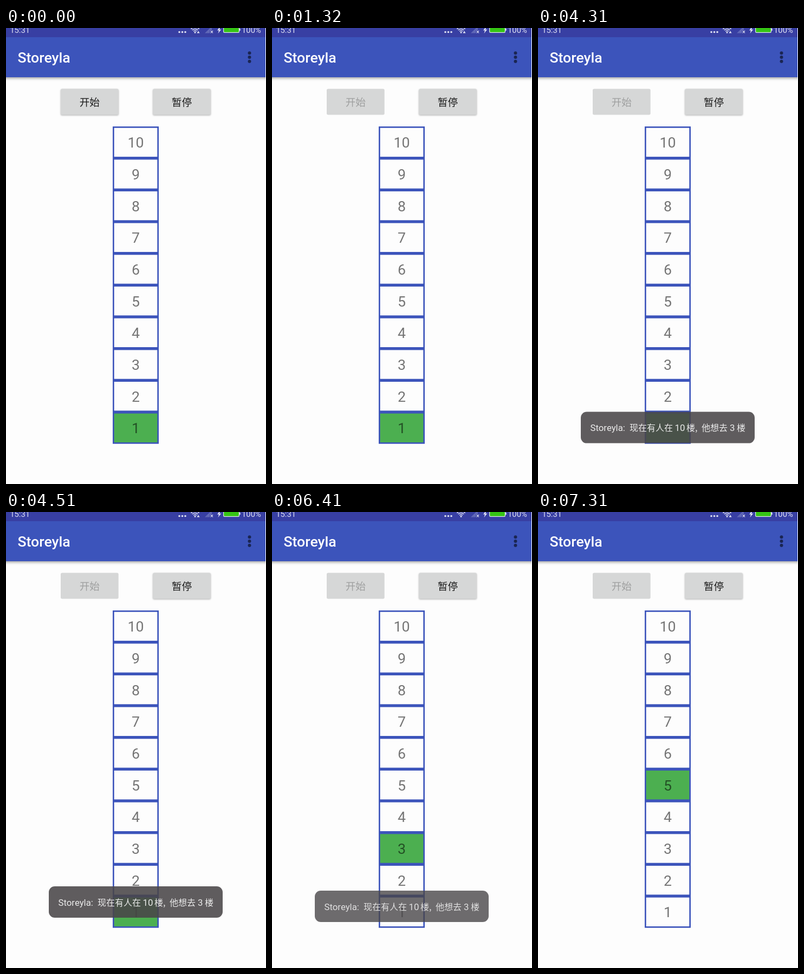
These frames come from a looping animation (480x843 px, 8 s). An HTML page with a canvas:

```html
<!DOCTYPE html>
<html lang="zh-CN">
<head>
<meta charset="utf-8">
<title>Storeyla</title>
<style>
html, body { margin: 0; width: 100%; height: 100%; overflow: hidden; background: #fdfdfd; }
canvas { display: block; width: 480px; height: 843px; }
</style>
</head>
<body>
<canvas id="stage"></canvas>
<script>
const W = 480, H = 843, LOOP = 8000;
const APP = "Storeyla";
const LATIN = 'Roboto, "Noto Sans CJK SC", "Noto Sans CJK", sans-serif';
const HAN = '"Noto Sans CJK SC", "Noto Sans CJK", sans-serif';
const BAR = "#3c54bb", STATUS = "#383fa3", PAGE = "#fdfdfd", GREEN = "#4caf50";

const canvas = document.getElementById("stage");
const ratio = window.devicePixelRatio || 1;
canvas.width = Math.round(W * ratio);
canvas.height = Math.round(H * ratio);
const c = canvas.getContext("2d");
c.scale(ratio, ratio);

const clamp = v => Math.max(0, Math.min(1, v));
const ease = v => (1 - Math.cos(Math.PI * clamp(v))) / 2;
const mix = (a, b, v) => a + (b - a) * v;
// Holds time on a fixed beat counted from a start point.
const beat = (t, start, len) => start + Math.floor((t - start) / len) * len;

function rect(x, y, w, h, color) {
  c.fillStyle = color;
  c.fillRect(x, y, w, h);
}

function round(x, y, w, h, r, color) {
  c.fillStyle = color;
  c.beginPath();
  c.roundRect(x, y, w, h, r);
  c.fill();
}

function dot(x, y, r, color) {
  c.fillStyle = color;
  c.beginPath();
  c.arc(x, y, r, 0, Math.PI * 2);
  c.fill();
}

function poly(points, color) {
  c.fillStyle = color;
  c.beginPath();
  points.forEach(([x, y]) => c.lineTo(x, y));
  c.closePath();
  c.fill();
}

function text(str, x, y, font, color, align = "left") {
  c.font = font;
  c.fillStyle = color;
  c.textAlign = align;
  c.fillText(str, x, y);
}

function shadow(blur, dy, alpha) {
  c.shadowColor = `rgba(0,0,0,${alpha})`;
  c.shadowBlur = blur * ratio;
  c.shadowOffsetY = dy * ratio;
}

function drawStatus(t) {
  const ink = "#dfe1f3", dim = "#6068b8";
  rect(0, 0, W, 17, STATUS);
  text("15:31", 7.2, 9.3, "400 14.8px " + LATIN, ink);
  [320, 325.5, 331].forEach(x => dot(x, 7.5, 1.8, ink));

  // Wi-Fi fan
  c.strokeStyle = ink;
  c.lineWidth = 1.6;
  [4, 7.2, 10.4].forEach(r => {
    c.beginPath();
    c.arc(349, 9, r, -Math.PI * 0.76, -Math.PI * 0.24);
    c.stroke();
  });
  dot(349, 8.2, 1.5, ink);
  if (t < 5890 || t >= 7040) poly([[352.4, 9.6], [355, 5.2], [357.6, 9.6]], ink);

  // Mobile signal, no service
  poly([[367, 9.5], [380, -3], [380, 9.5]], dim);
  rect(376.5, 4, 7, 6, STATUS);
  c.strokeStyle = ink;
  c.lineWidth = 1.1;
  c.beginPath();
  c.moveTo(377.8, 5);
  c.lineTo(382, 9.3);
  c.moveTo(382, 5);
  c.lineTo(377.8, 9.3);
  c.stroke();

  // Charging battery
  poly([[394.5, -2], [390, 4.5], [393, 4.5], [391.5, 10], [397.3, 2.8], [394, 2.8], [396, -2]], ink);
  round(401, -3, 30, 12, 2.5, ink);
  round(402.2, -2, 27.6, 9.8, 1.5, "#35c414");
  rect(431, 1, 1.6, 4, ink);
  text("100%", 435, 9.3, "400 14.8px " + LATIN, ink);
}

function drawToolbar() {
  c.save();
  shadow(5, 2, 0.38);
  rect(-10, 17, W + 20, 74, BAR);
  c.restore();
  text(APP, 21.5, 64, "500 26.67px " + LATIN, "#fff");
  [46.3, 54, 61.7].forEach(y => dot(449.5, y, 3, "rgba(0,0,0,.56)"));
}

function drawButton(x, label, lift, enabled) {
  c.save();
  if (lift > 0) shadow(2 + 2 * lift, 0.6 + lift, 0.3);
  round(x, 112.5, 106.7, 48, 2.7, "#d6d7d7");
  c.restore();
  text(label, x + 53.3, 144, "400 18.67px " + HAN,
    enabled ? "rgba(0,0,0,.87)" : "rgba(0,0,0,.26)", "center");
}

function drawStart(t) {
  const s = beat(t, 560, 95);
  const enabled = t < 750;
  const lift = t < 560 ? 0.5 : enabled ? 1 : clamp((1035 - s) / 380);
  drawButton(101, "开始", lift, enabled);
  if (t < 560 || t >= 1320) return;
  const grow = ease((s - 465) / 380);
  const fade = 1 - clamp((s - 750) / 570);
  c.save();
  c.beginPath();
  c.roundRect(101, 112.5, 106.7, 48, 2.7);
  c.clip();
  dot(154, 137, mix(8, 62, grow), `rgba(0,0,0,${0.15 * fade})`);
  c.restore();
}

function drawShaft(t) {
  const line = 2.67, pitch = 58.67, left = 197, width = 85, top = 182;
  const active = 1 + [5000, 5720, 6510, 7310].filter(start => t >= start).length;
  rect(left, top, width, pitch * 10, BAR);
  for (let floor = 10; floor >= 1; floor--) {
    const y = top + (10 - floor) * pitch;
    rect(left + line, y + line, width - 2 * line, pitch - 2 * line,
      floor === active ? GREEN : PAGE);
    text(String(floor), 239.5, y + 39.3, "400 26.67px " + LATIN, "rgba(0,0,0,.54)", "center");
  }
}

function drawToast(t) {
  if (t < 4010 || t >= 6770) return;
  const s = beat(t, 4010, 100);
  const y = s <= 4510
    ? mix(743, 692, ease((s - 4010) / 500))
    : mix(692, 700, ease((s - 4510) / 200));
  const shown = clamp(0.03 + (s - 4010) / 300);
  const gone = t < 6410 ? 1 : t < 6510 ? 0.9 : t < 6610 ? 0.57 : 0.24;
  c.save();
  c.globalAlpha = shown * gone;
  round(79, y, 321, 58, 11, "rgba(73,70,72,.88)");
  const base = y + 35.5, ink = "#fff", soft = "rgba(255,255,255,.88)";
  const latin = "400 16.8px " + LATIN, han = "300 16px " + HAN;
  text(APP + ":", 96.5, base, latin, soft);
  text("现在有人在", 169, base, han, soft);
  text("10", 252.5, base, latin, soft);
  text("楼,", 274, base, han, soft);
  text("他想去", 302, base, han, soft);
  text("3", 354, base, latin, soft);
  text("楼", 367, base, han, soft);
  c.restore();
}

function draw(t) {
  rect(0, 0, W, H, PAGE);
  drawToolbar();
  drawStatus(t);
  // The screen is one pixel narrower than the stage.
  rect(W - 1, 0, 1, H, PAGE);
  drawStart(t);
  drawButton(271.2, "暂停", 0.5, true);
  drawShaft(t);
  drawToast(t);
}

let origin = null;
function tick(now) {
  if (origin === null) origin = now;
  draw((now - origin) % LOOP);
  requestAnimationFrame(tick);
}
draw(0);
requestAnimationFrame(tick);
</script>
</body>
</html>
```
